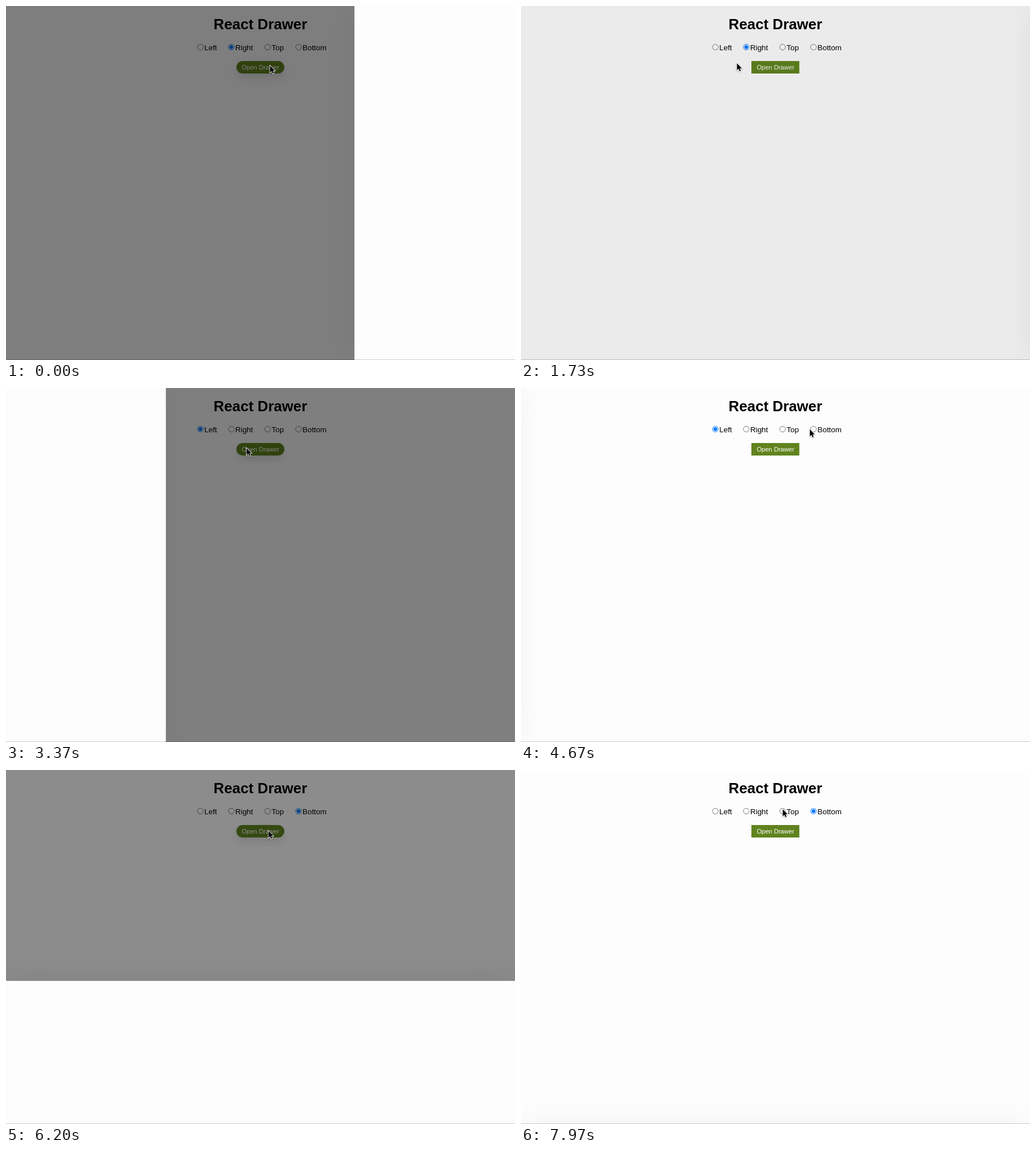
An HTML page for the animation above (8 s loop, 897 px wide and 624 px high).

```html
<!DOCTYPE html>
<html lang="en">
<head>
<meta charset="utf-8">
<title>React Drawer</title>
<style>
  html, body { margin: 0; width: 100%; height: 100%; overflow: hidden; background: #fdfdfd; }
  svg, div { position: absolute; left: 0; top: 0; }
  svg { width: 897px; height: 624px; font: 13.4px "Liberation Sans", Arial, sans-serif; }
  #overlay { width: 897px; height: 624px; background: #000; }
  #drawer { background: #fdfdfd; }
  #line { width: 897px; height: 1px; top: 623px; background: rgba(0, 0, 0, .2); }
</style>
</head>
<body>
<svg viewBox="0 0 897 624">
  <text x="448.3" y="41.2" text-anchor="middle" font-size="25.8" font-weight="700">React Drawer</text>
  <g id="radios"></g>
  <rect id="button" x="406" y="97" width="84.5" height="22" fill="#60831e"/>
  <text x="448.4" y="112" text-anchor="middle" font-size="11.1" fill="#fff">Open Drawer</text>
</svg>
<div id="overlay"></div>
<div id="drawer"></div>
<div id="line"></div>
<svg viewBox="0 0 897 624">
  <path id="cursor" d="M0 0V12.2L2.8 9.6 4.6 13.8 6.7 12.9 4.9 8.8H8.6Z" stroke="#fff" stroke-width="1.6"
    paint-order="stroke" style="filter: drop-shadow(0 1px 1px rgba(0,0,0,.3))"/>
</svg>
<script>
const LOOP = 8000, W = 897, H = 624, SIZE = 283;
const OPEN_TIME = 410, CLOSE_TIME = 500, FADE_TIME = 850, MOVE_TIME = 300;
const $ = id => document.getElementById(id);
const clamp = v => Math.max(0, Math.min(1, v));
const smooth = v => { v = clamp(v); return v * v * (3 - 2 * v); };

const radioX = { Left: 342.5, Right: 397, Top: 461, Bottom: 515.5 };

// when a side is selected, and when its drawer opens and closes
const cycles = [
  { side: 'Right', select: 0, open: -1000, close: 1000 },
  { side: 'Left', select: 2100, open: 2977, close: 3730 },
  { side: 'Bottom', select: 4950, open: 5875, close: 7000 }
];

// pointer moves: start time and the place to glide to
const home = { x: 465.3, y: 105.3 };
const moves = [
  { at: 470, x: 471, y: 158 },
  { at: 1541, x: 341, y: 76 },
  { at: 2500, x: 424, y: 106 },
  { at: 4100, x: 544, y: 92 },
  { at: 4370, x: 509, y: 73 },
  { at: 5000, x: 500, y: 104 },
  { at: 5530, x: 462.5, y: 107.3 },
  { at: 6370, x: 502, y: 172 },
  { at: 7660, x: 461.3, y: 69.3 }
];

function pointer(t) {
  return moves.reduce((p, m) => {
    const k = smooth((t - m.at) / MOVE_TIME);
    return { x: p.x + (m.x - p.x) * k, y: p.y + (m.y - p.y) * k };
  }, home);
}

// 1 inside the button, falling to 0 a few pixels outside it
function hoverAt({ x, y }) {
  const dx = Math.max(406 - x, 0, x - 490.5), dy = Math.max(97 - y, 0, y - 119);
  return 1 - smooth(Math.hypot(dx, dy) / 8);
}

$('radios').innerHTML = Object.entries(radioX).map(([name, x]) =>
  `<circle cx="${x}" cy="72.5" r="5" fill="#fff"/><circle cx="${x}" cy="72.5" r="3.2" fill="#0075ff"/>
   <text x="${x + 7}" y="78">${name}</text>`).join('');
const circles = [...document.querySelectorAll('#radios circle')];

function drawRadios(side) {
  Object.keys(radioX).forEach((name, i) => {
    const on = name === side, [ring, dot] = circles.slice(2 * i);
    ring.setAttribute('stroke', on ? '#0075ff' : '#767676');
    dot.setAttribute('opacity', on ? 1 : 0);
  });
}

function drawDrawer(side, shown) {
  const style = $('drawer').style, flat = side === 'Bottom', off = SIZE * shown;
  const x = flat ? 0 : side === 'Left' ? off - SIZE : W - off;
  style.width = (flat ? W : SIZE) + 'px';
  style.height = (flat ? SIZE : H) + 'px';
  style.transform = `translate(${x}px, ${flat ? H - off : 0}px)`;
  style.boxShadow = `0 0 50px rgba(0, 0, 0, ${.05 + .13 * Math.sin(Math.PI * shown)})`;
}

function draw(t) {
  const { side, open, close } = cycles.filter(c => c.select <= t).pop();
  const opened = smooth((t - open) / OPEN_TIME);
  drawRadios(side);
  drawDrawer(side, opened * (1 - smooth((t - close) / CLOSE_TIME)));
  $('overlay').style.opacity = .5 * opened * (1 - clamp((t - close) / FADE_TIME));

  const tip = pointer(t), hover = hoverAt(tip);
  $('button').setAttribute('rx', 11 * hover);
  $('button').style.filter = `drop-shadow(0 8px 7.5px rgba(0, 0, 0, ${.1 * hover}))`;
  $('cursor').setAttribute('transform', `translate(${tip.x} ${tip.y})`);
}

const start = performance.now();
function tick() {
  draw((performance.now() - start) % LOOP);
  requestAnimationFrame(tick);
}
tick();
</script>
</body>
</html>
```
